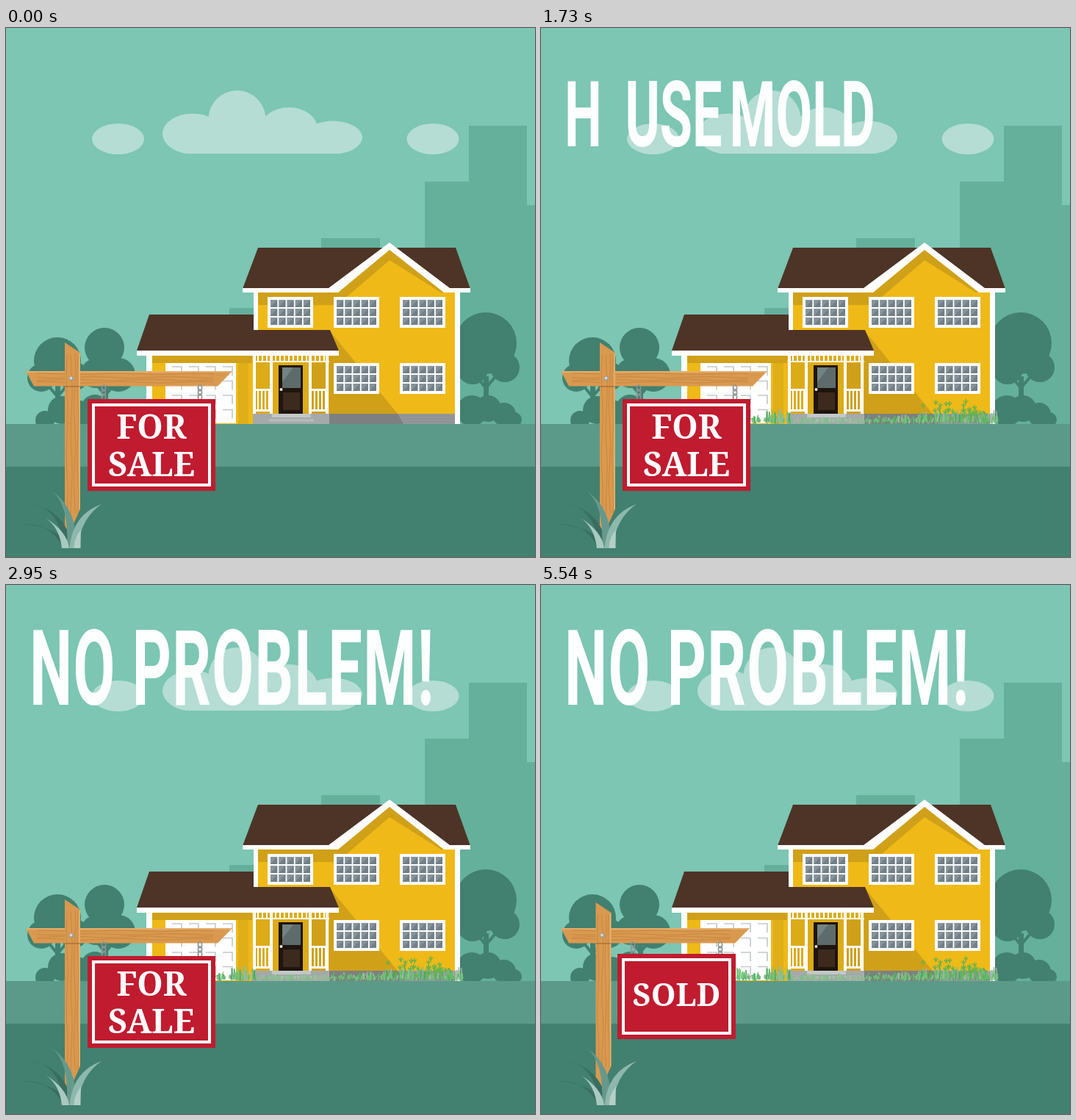
Write an HTML page with a canvas that moves like this. It is 720x720 px and loops after 5.59 s.

```html
<!DOCTYPE html>
<html lang="en">
<head>
<meta charset="utf-8">
<title>House for sale</title>
<style>
html, body { margin: 0; width: 100%; height: 100%; overflow: hidden; background: #7cc6b3; }
canvas { display: block; }
</style>
</head>
<body>
<canvas id="stage" width="720" height="720"></canvas>
<script>
const SIZE = 720, LOOP = 5590;
const C = {
  sky: '#7cc6b3', city: '#64b09b', cloud: '#b5ddd3', tree: '#42806f', strip: '#5b9a89',
  roof: '#4d3426', wall: '#efb918', shade: '#d0a018', glass: '#87939a', red: '#c01b2f'
};
const DISPLAY = 'Roboto, "Liberation Sans", sans-serif';
const SERIF = '"Noto Serif", "Liberation Serif", serif';
const NARROW = 0.58; // condensed look of the headline face

const stage = document.getElementById('stage').getContext('2d');
let g = stage;

const clamp = v => Math.max(0, Math.min(1, v));
const smooth = v => v * v * (3 - 2 * v);

function random(seed) {
  return () => (seed = (seed * 16807) % 2147483647) / 2147483647;
}
function rect(color, x0, y0, x1, y1) {
  g.fillStyle = color;
  g.fillRect(x0, y0, x1 - x0, y1 - y0);
}
function poly(color, ...p) {
  g.fillStyle = color;
  g.beginPath();
  for (let i = 0; i < p.length; i += 2) g.lineTo(p[i], p[i + 1]);
  g.closePath();
  g.fill();
}
function oval(color, x, y, rx, ry = rx) {
  g.fillStyle = color;
  g.beginPath();
  g.ellipse(x, y, rx, ry, 0, 0, Math.PI * 2);
  g.fill();
}
function line(color, width, ...p) {
  g.strokeStyle = color;
  g.lineWidth = width;
  g.beginPath();
  for (let i = 0; i < p.length; i += 2) g.lineTo(p[i], p[i + 1]);
  g.stroke();
}
function layer(draw) {
  const c = document.createElement('canvas');
  c.width = c.height = SIZE;
  g = c.getContext('2d');
  draw();
  g = stage;
  return c;
}

function clouds() {
  oval(C.cloud, 152.5, 151, 35.5, 21);
  oval(C.cloud, 581, 151, 35.5, 21);
  g.save();
  g.beginPath();
  g.rect(200, 70, 300, 101);
  g.clip();
  oval(C.cloud, 254, 144, 41, 27.5);
  oval(C.cloud, 314.5, 124, 39, 39);
  oval(C.cloud, 385, 137, 39, 29);
  oval(C.cloud, 445, 149, 40, 22.5);
  rect(C.cloud, 250, 140, 446, 171);
  g.restore();
}

function trunk(x, top, base) {
  rect(C.tree, x - 3, top, x + 4, base);
  line(C.tree, 4, x - 16, top - 4, x, top + 16);
  line(C.tree, 4, x + 17, top - 4, x, top + 16);
}
function blobs(list) {
  for (const [x, y, r] of list) oval(C.tree, x, y, r);
}
function trees() {
  blobs([[70, 453, 32], [48, 476, 19], [92, 474, 20]]);
  trunk(70, 486, 530);
  blobs([[134, 435, 27], [122, 470, 20], [134, 470, 22], [153, 472, 23]]);
  trunk(135, 484, 530);
  blobs([[653, 429, 42], [635, 464, 21], [679, 462, 20]]);
  trunk(653, 474, 530);
  g.save();
  g.beginPath();
  g.rect(0, 480, SIZE, 59);
  g.clip();
  blobs([[53, 534, 13], [76, 520, 19], [96, 526, 20], [121, 518, 19], [144, 526, 19],
    [163, 531, 13], [634, 521, 21], [656, 518, 18], [678, 526, 16], [692, 533, 10]]);
  g.restore();
}

function pane(x, y, w = 62, h = 42) {
  rect('#fff', x, y, x + w, y + h);
  const cols = 5, rows = 3, cw = (w - 6) / cols, ch = (h - 6) / rows;
  for (let i = 0; i < cols; i++) for (let j = 0; j < rows; j++) {
    const px = x + 3 + i * cw, py = y + 3 + j * ch;
    rect(C.glass, px + 1, py + 1, px + cw - 1, py + ch - 1);
    poly('#727f87', px + cw - 1, py + 1, px + cw - 1, py + ch - 1, px + 1, py + ch - 1);
  }
}

function upperHouse() {
  rect(C.wall, 337, 356, 617, 525);
  rect('#94989a', 440, 525, 612, 539);
  for (let y = 528; y < 539; y += 4) line('#868b8d', 1, 440, y, 612, y);
  poly(C.shade, 440, 411, 446, 419, 533, 525, 440, 525);
  poly('#7c8081', 440, 525, 533, 525, 541, 539, 440, 539);
  poly(C.roof, 343, 299, 612, 299, 632, 355, 322, 355);
  poly(C.wall, 522, 299, 600, 360, 444, 360);
  rect(C.shade, 343, 360, 452, 377);
  poly(C.shade, 522, 300, 606, 360, 592, 360, 522, 316, 452, 376, 446, 358);
  poly('#fff', 322, 354, 439, 354, 522, 292, 604, 354, 632, 354, 632, 360,
    596, 360, 522, 302, 452, 360, 322, 360);
  rect('#fff', 337, 360, 343, 411);
  rect('#fff', 611, 360, 618, 539);
  pane(356, 366);
  pane(446, 366);
  pane(536, 366);
  pane(446, 456);
  pane(536, 456);
}

function garage() {
  rect(C.wall, 192, 446, 338, 539);
  rect('#e0ae18', 316, 456, 330, 539);
  rect(C.shade, 199, 446, 335, 456);
  rect('#fff', 191, 446, 199, 539);
  rect('#fff', 217, 456, 313, 538);
  for (let i = 0; i < 4; i++) for (let j = 0; j < 4; j++) {
    const x = 221 + i * 23, y = 461 + j * 19.5;
    line('#c3c8cc', 1.6, x + 5, y, x + 18, y, x + 18, y + 12);
  }
}

function porch() {
  rect('#dcab18', 336, 446, 440, 525);
  rect(C.shade, 416, 456, 436, 525);
  rect('#a4a9aa', 336, 525, 440, 539);
  rect('#c2c7c7', 362, 525, 415, 530);
  rect('#b3b9b9', 358, 532, 419, 536);
  for (let x = 342; x < 438; x += 6) rect('#fff', x, 446, x + 2, 454);
  rect('#fff', 336, 453, 440, 455);
  for (const x of [336, 359, 412, 435]) rect('#fff', x, 446, x + 4, 525);
  for (const x of [337, 414]) {
    rect('#fff', x, 491, x + 24, 494);
    rect('#fff', x, 519, x + 24, 522);
    for (let k = 5; k < 22; k += 5) rect('#fff', x + k, 494, x + k + 2, 520);
  }
  rect('#1f140e', 371, 459, 404, 525);
  rect('#5d6c6b', 376, 462, 401, 490);
  poly('#728381', 376, 462, 391, 462, 376, 482);
  rect('#3c2a1f', 377, 496, 400, 520);
  oval('#e6e6e6', 374.5, 492, 2);
}

function scenery() {
  rect(C.sky, 0, 0, SIZE, SIZE);
  rect(C.city, 570, 209, 720, 539);
  rect(C.city, 630, 133, 709, 210);
  rect(C.sky, 709, 200, 720, 241);
  rect(C.city, 429, 286, 509, 320);
  rect(C.city, 304, 381, 340, 400);
  clouds();
  trees();
  rect(C.strip, 0, 539, SIZE, 597);
  rect(C.tree, 0, 597, SIZE, SIZE);
  upperHouse();
  garage();
  porch();
  poly(C.roof, 195, 390, 337, 390, 337, 411, 441, 411, 453, 439, 178, 439);
  rect('#fff', 178, 439, 453, 446);
}

function leaf(color, x, y, cx, cy, tx, ty, w) {
  g.fillStyle = color;
  g.beginPath();
  g.moveTo(x - w / 2, y);
  g.quadraticCurveTo(cx - w / 2, cy, tx, ty);
  g.quadraticCurveTo(cx + w / 2, cy + w / 2, x + w / 2, y);
  g.fill();
}
function tuft() {
  leaf('#3a6d60', 84, 702, 76, 652, 33, 647, 10);
  leaf('#3a6d60', 82, 706, 66, 674, 23, 675, 10);
  leaf('#66998b', 89, 708, 92, 648, 62, 630, 12);
  leaf('#8db8ab', 92, 708, 96, 662, 130, 648, 11);
  leaf('#a8cabf', 81, 708, 78, 680, 54, 667, 10);
  leaf('#b4cfc6', 97, 708, 97, 694, 102, 683, 9);
}

// Mold and weeds along the foot of the house
const weeds = (() => {
  const rnd = random(4217), tones = ['#5dbb66', '#6cc873', '#4fa65c', '#7fbf8a', '#a7b8a6'];
  return Array.from({ length: 520 }, () => {
    const x = 195 + rnd() * 427;
    const side = x < 340 || x > 442;
    const bump = x < 340 ? 9 + 9 * Math.abs(Math.sin(x / 23)) : 9 + 7 * clamp((x - 480) / 60);
    return {
      x, y: 539 - rnd() * 4,
      h: (side ? bump : 7) * (0.25 + 0.75 * rnd()),
      lean: (rnd() - 0.5) * 5,
      color: side ? tones[Math.floor(rnd() * 5)] : tones[3 + Math.floor(rnd() * 2)],
      at: 640 + rnd() * 950
    };
  });
})();
const sprigs = (() => {
  const rnd = random(93);
  return Array.from({ length: 30 }, () => ({
    x: 520 + rnd() * 84, y: 508 + rnd() * 24, at: 700 + rnd() * 900
  }));
})();
function growWeeds(t) {
  for (const w of weeds) {
    const k = clamp((t - w.at) / 100);
    if (k) line(w.color, 1.4, w.x, w.y, w.x + w.lean * k, w.y - w.h * k);
  }
  for (const s of sprigs) if (t > s.at) {
    line('#63b34c', 1.3, s.x, s.y + 4, s.x, s.y - 3);
    line('#63b34c', 1.3, s.x - 3, s.y - 1, s.x, s.y + 2, s.x + 3, s.y - 1);
  }
}

function grain(x0, x1, y0, y1, seed, upright) {
  const rnd = random(seed);
  const n = 5, span = upright ? x1 - x0 : y1 - y0;
  g.globalAlpha = 0.55;
  for (let i = 1; i < n; i++) {
    const off = span * i / n + rnd() * 2 - 1, p = [];
    const from = upright ? y0 : x0, to = upright ? y1 : x1;
    for (let s = from; s <= to; s += 8) {
      const o = off + Math.sin(s / 17 + i * 2) * 0.9;
      p.push(...(upright ? [x0 + o, s] : [s, y0 + o]));
    }
    line('#b87538', 0.9, ...p);
  }
  g.globalAlpha = 1;
}
function chain(x, y0, y1) {
  g.strokeStyle = '#8e9495';
  g.lineWidth = 1.6;
  for (let y = y0; y < y1; y += 6) {
    g.beginPath();
    g.ellipse(x, y + 3, 2.6, 4, 0, 0, Math.PI * 2);
    g.stroke();
  }
}
function sign({ post, top, arm, panel, chains, words, font }) {
  const [x0, y0, x1, y1] = panel, right = post + 21;
  poly('#d9994f', 27, 467, arm, 467, arm - 20, 487.5, 38, 487.5);
  line('#eab574', 1.5, 28, 468, arm - 1, 468);
  grain(42, arm - 20, 468, 487, 11, false);
  poly('#d9994f', post, top, right, top + 14, right, 655, post + 7, 686, post, 680);
  line('#eab574', 1.5, right - 1, top + 15, right - 1, 655);
  grain(post, right, top + 16, 660, 37, true);
  line('rgba(120,70,25,.45)', 1.5, post, 488, right, 488);
  oval('#9a9a96', post + 9, 477, 3.2);
  oval('#d6d8d6', post + 8.5, 476.5, 2);
  for (const x of chains) chain(x, 487, y0);
  rect(C.red, x0, y0, x1, y1);
  g.strokeStyle = '#fff';
  g.lineWidth = 4;
  g.strokeRect(x0 + 8, y0 + 8, x1 - x0 - 16, y1 - y0 - 16);
  g.fillStyle = '#fff';
  g.font = `700 ${font}px ${SERIF}`;
  g.textAlign = 'center';
  for (const [word, y] of words) g.fillText(word, (x0 + x1) / 2, y);
  g.textAlign = 'left';
}
const forSale = {
  post: 80, top: 428, arm: 308, panel: [111, 505, 285, 630], chains: [133, 264],
  words: [['FOR', 559], ['SALE', 610]], font: 45, pivot: [88, 703]
};
const sold = {
  post: 74.5, top: 432, arm: 284, panel: [104, 502, 265, 618], chains: [125, 244],
  words: [['SOLD', 573]], font: 43, pivot: [80, 687]
};
function turned(s, degrees) {
  const [x, y] = s.pivot;
  g.save();
  g.translate(x, y);
  g.rotate(degrees * Math.PI / 180);
  g.translate(-x, -y);
  sign(s);
  g.restore();
}
function signs(t) {
  const angle = 171 * smooth(clamp((t - 3410) / 450));
  if (angle < 171) turned(forSale, angle);
  if (angle > 0) turned(sold, angle - 171);
}

// state(i) gives each letter's alpha, lift and share of its advance
function lettering(str, x, base, size, gap, state) {
  g.font = `700 ${size}px ${DISPLAY}`;
  g.fillStyle = '#fdfefe';
  [...str].forEach((ch, i) => {
    const { alpha, lift = 0, room = 1 } = state(i);
    if (alpha > 0) {
      g.save();
      g.globalAlpha = alpha;
      g.translate(x, base - lift);
      g.scale(NARROW, 1);
      g.fillText(ch, 0, 0);
      g.restore();
    }
    x += (g.measureText(ch).width * NARROW + gap) * room;
  });
}
const leaveAt = [1900, 1604, 1800, 1850, 1760, 1576, 1880, 1780, 1830, 1920, 1520];
function headline(t) {
  if (t < 2300) {
    lettering('HOUSE MOLD?', 32, 161, 124, 0, i => {
      const out = clamp((t - leaveAt[i]) / 350), gone = clamp(out / 0.3);
      return { alpha: clamp((t - 90 - i * 60) / 80) * (1 - gone), lift: 30 * gone, room: 1 - out };
    });
  }
  const alpha = clamp((t - 2230) / 360);
  if (alpha) lettering('NO PROBLEM!', 32, 163, 142, 1.4, () => ({ alpha }));
}

const backdrop = layer(scenery);
const frontGrass = layer(tuft);

function frame() {
  const t = performance.now() % LOOP;
  g.drawImage(backdrop, 0, 0);
  growWeeds(t);
  headline(t);
  signs(t);
  g.drawImage(frontGrass, 0, 0);
  requestAnimationFrame(frame);
}
frame();
</script>
</body>
</html>
```
